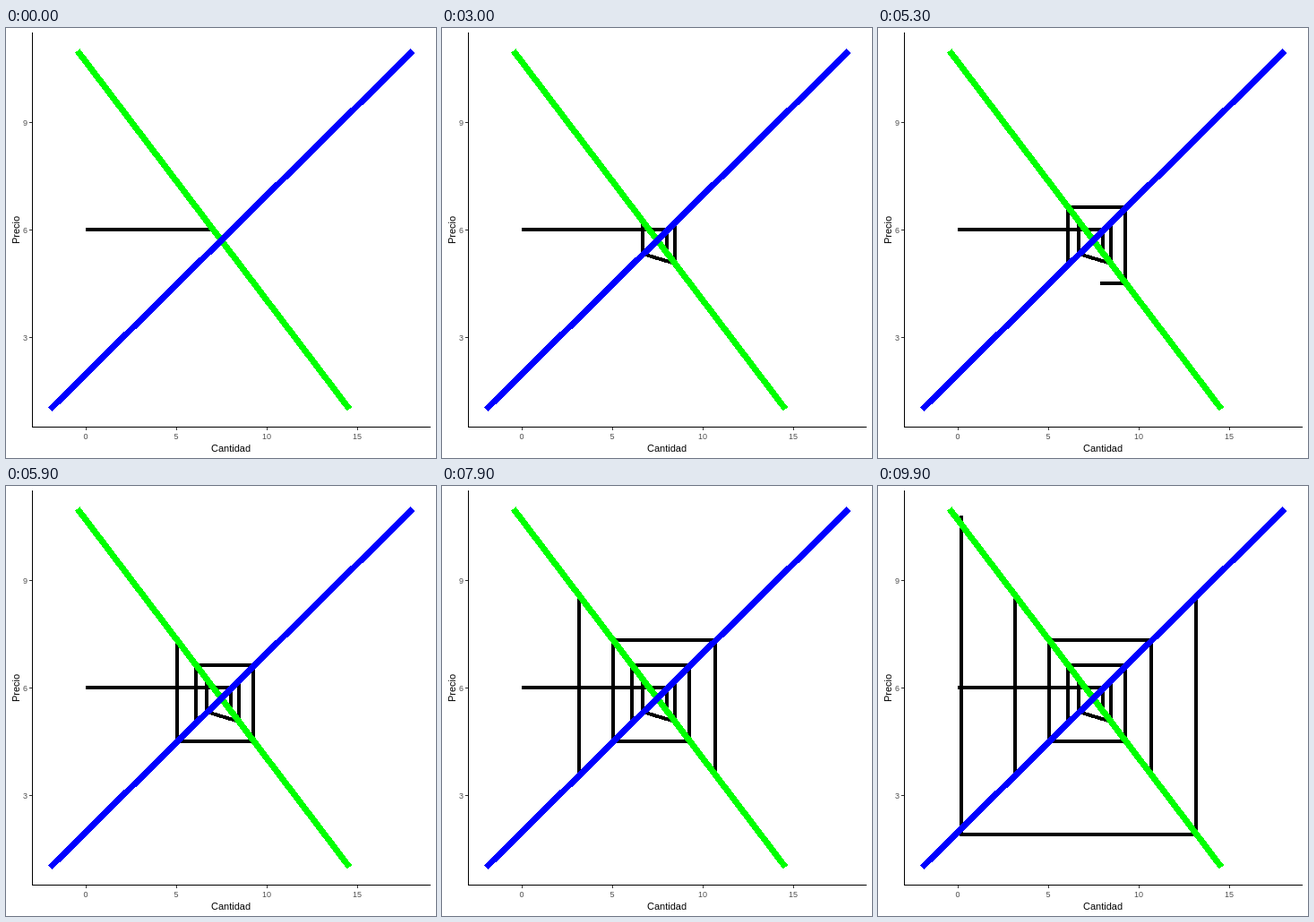
Animation of 480 by 480 pixels, one loop 10000 ms. Source, as an HTML page:

```html
<!DOCTYPE html>
<html lang="es">
<head>
<meta charset="utf-8">
<title>Precio y cantidad</title>
<style>
  html, body { margin: 0; width: 100%; height: 100%; overflow: hidden; background: #fff; }
  svg { display: block; width: 100vw; height: 100vh; }
  path { fill: none; shape-rendering: crispEdges; }
  text { font-family: "Liberation Sans", Arial, sans-serif; text-anchor: middle; }
  .tick { font-size: 9px; fill: #4d4d4d; }
  .left { text-anchor: end; }
  .title { font-size: 11px; }
  .axis { stroke: #000; }
  .marks { stroke: #333; }
  .web { stroke: #000; stroke-width: 4; stroke-linejoin: round; }
  .curve { stroke-width: 7; }
</style>
</head>
<body>
<svg viewBox="0 0 480 480">
  <path id="web" class="web"/>
  <path id="demand" class="curve" stroke="#0f0"/>
  <path id="supply" class="curve" stroke="#00f"/>
  <path class="axis" d="M29.5 5V446M29 445.5H474"/>
  <path id="marks" class="marks"/>
  <g id="labels" class="tick"></g>
  <text class="title" x="251" y="473">Cantidad</text>
  <text class="title" transform="translate(15 225.5) rotate(-90)">Precio</text>
</svg>
<script>
  const STEP = 100, STEPS = 100, LEGS = 10;
  const $ = id => document.getElementById(id);

  // Market model and plot scales
  const demand = p => 16 - 1.5 * p;
  const supply = p => 2 * p - 4;
  const clearing = q => (16 - q) / 1.5;
  const X = q => 89.25 + 20.24 * q;
  const Y = p => 464.95 - 40 * p;

  function drawCurve(id, quantity) {
    const end = p => [X(quantity(p)) + 0.7, Y(p) + 0.55];
    $(id).setAttribute("d", "M" + end(1) + "L" + end(11));
  }

  function drawTicks() {
    let marks = "", labels = "";
    for (let p = 3; p <= 9; p += 3) {
      const y = Math.round(Y(p));
      marks += `M26 ${y + 0.5}h3`;
      labels += `<text class="left" x="24" y="${y + 4}">${p}</text>`;
    }
    for (let q = 0; q <= 15; q += 5) {
      const x = Math.floor(X(q)) + 0.5;
      marks += `M${x} 446v3`;
      labels += `<text x="${x - 0.5}" y="459">${q}</text>`;
    }
    $("marks").setAttribute("d", marks);
    $("labels").innerHTML = labels;
  }

  // Cobweb: each leg is a vertical that appears at once; the line glides
  // to the next leg unless that one starts a new stroke.
  function buildWeb() {
    const newStroke = [2, 4, 8, 9], reversed = [2, 3];
    let price = 6;
    let run = [0, demand(price)].map(q => ({ step: 0, x: X(q), y: Y(price) }));
    const runs = [run];
    for (let leg = 1; leg <= LEGS; leg++) {
      const q = supply(price), next = clearing(q);
      const ends = reversed.includes(leg) ? [next, price] : [price, next];
      const step = Math.round(leg * (STEPS - 1) / LEGS);
      if (newStroke.includes(leg)) runs.push(run = []);
      run.push(...ends.map(p => ({ step, x: X(Math.abs(q)), y: Y(p) })));
      price = next;
    }
    return runs;
  }

  function trace(run, step) {
    const points = run.filter(p => p.step <= step);
    if (!points.length) return "";
    const from = points[points.length - 1], to = run[points.length];
    if (to) {
      const k = (step - from.step) / (to.step - from.step);
      points.push({ x: from.x + (to.x - from.x) * k, y: from.y + (to.y - from.y) * k });
    }
    return "M" + points.map(p => [Math.round(p.x), Math.round(p.y)]).join("L");
  }

  drawCurve("demand", demand);
  drawCurve("supply", supply);
  drawTicks();
  const runs = buildWeb();

  let last = -1;
  function draw() {
    const step = Math.floor(performance.now() / STEP) % STEPS;
    if (step !== last) {
      $("web").setAttribute("d", runs.map(run => trace(run, step)).join(""));
      last = step;
    }
    requestAnimationFrame(draw);
  }
  draw();
</script>
</body>
</html>
```
